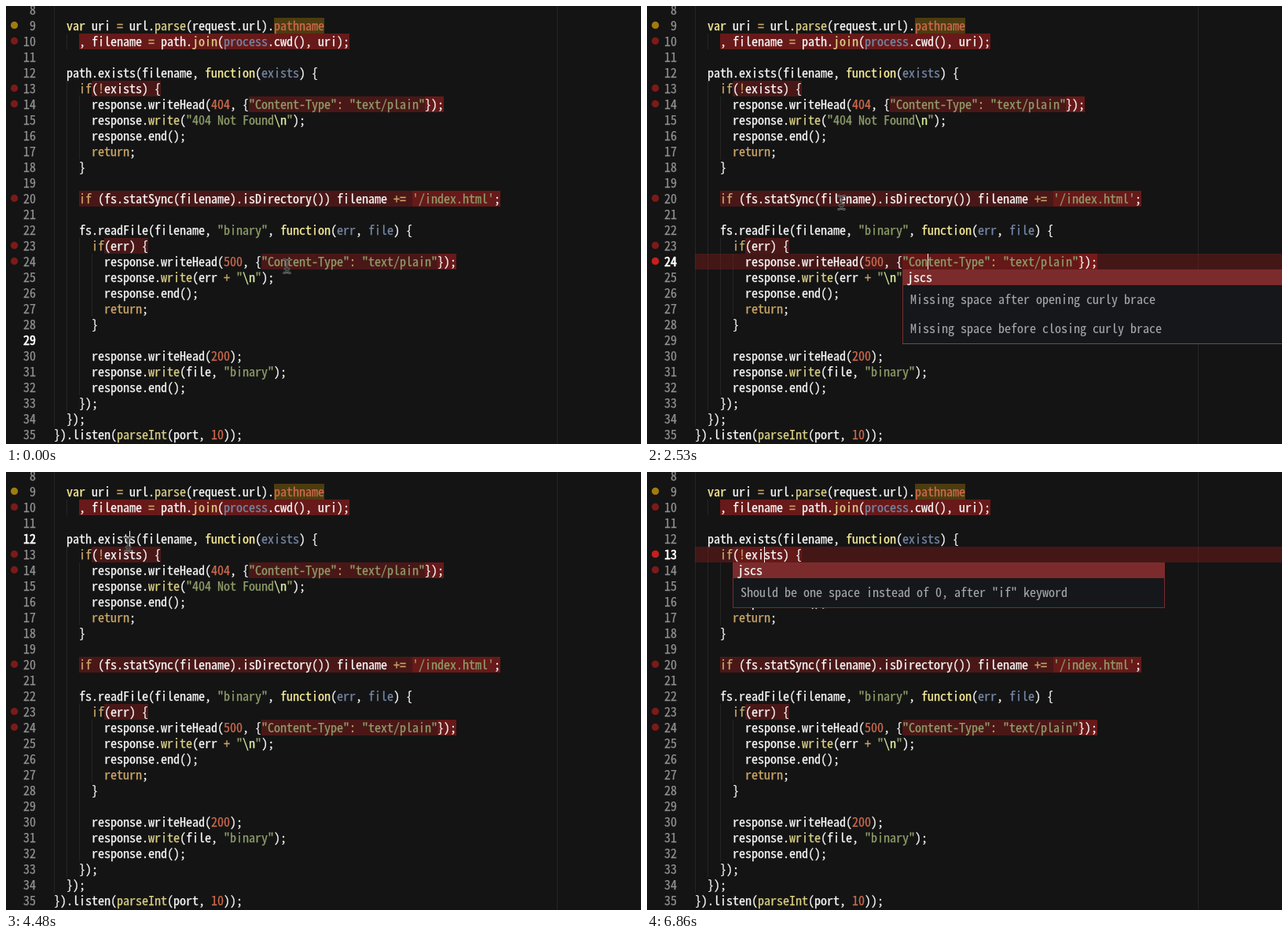
Write an HTML page that moves like this. It is 808 px wide and 557 px high and loops after 6.99 s.

```html
<!DOCTYPE html>
<html lang="en">
<head>
<meta charset="utf-8">
<title>Linter messages in a code editor</title>
<style>
html, body { margin: 0; width: 100%; height: 100%; overflow: hidden; background: #141414; }
svg {
  display: block;
  width: 808px;
  height: 557px;
  font-family: "Noto Sans Mono CJK JP", "Noto Sans Mono", "DejaVu Sans Mono", monospace;
  font-variant-ligatures: none;
}
text { white-space: pre; color: #f8f8f8; }
text, tspan { fill: currentColor; stroke: currentColor; stroke-width: .25px; }
.storage { color: #f9ee98; }
.keyword { color: #cda869; }
.support { color: #dad085; }
.string { color: #8f9d6a; }
.escape { color: #ddf2a4; }
.number { color: #cf6a4c; }
.param { color: #7587a6; }
.gutter { color: #909090; text-anchor: end; }
.now { color: #fff; stroke-width: .5px; }
.note { color: #a6a8ab; stroke-width: .1px; }
.guide { fill: #252525; }
.mark { fill: rgba(140, 28, 28, .45); }
.warn { fill: #4d3c10; }
.bar { fill: rgba(140, 28, 28, .4); }
.caret { fill: #f8f8f8; }
.dot { fill: #7c1a1a; }
.dot.hot { fill: #c81e1e; }
.dot.amber { fill: #a07b10; }
.panel { fill: #15171a; stroke: #7b2b2b; }
.head { fill: #7b2b2b; }
.foot { fill: #55565a; }
#mouse { fill: none; stroke-linecap: round; }
</style>
</head>
<body>
<svg viewBox="0 0 808 557">
  <defs>
    <path id="beam" d="M-4-8.5Q0-8.5 0-5.5Q0-8.5 4-8.5M0-5.5V5.5M-4 8.5Q0 8.5 0 5.5Q0 8.5 4 8.5M-2.5 3.5H2.5"/>
  </defs>
  <g id="guides"></g>
  <g id="bars"></g>
  <g id="marks"></g>
  <g id="code"></g>
  <g id="over"></g>
  <g id="carets"></g>
  <g id="mouse">
    <use href="#beam" stroke="#8d8d8d" stroke-width="2.4"/>
    <use href="#beam" stroke="#111"/>
  </g>
</svg>
<script>
const LOOP = 6990, FIRST = 8, LEFT = 61, CELL = 8, ROW = 20;

const lines = String.raw`

  var uri = url.parse(request.url).pathname
    , filename = path.join(process.cwd(), uri);

  path.exists(filename, function(exists) {
    if(!exists) {
      response.writeHead(404, {"Content-Type": "text/plain"});
      response.write("404 Not Found\n");
      response.end();
      return;
    }

    if (fs.statSync(filename).isDirectory()) filename += '/index.html';

    fs.readFile(filename, "binary", function(err, file) {
      if(err) {
        response.writeHead(500, {"Content-Type": "text/plain"});
        response.write(err + "\n");
        response.end();
        return;
      }

      response.writeHead(200);
      response.write(file, "binary");
      response.end();
    });
  });
}).listen(parseInt(port, 10));`.split('\n').slice(1);

const blankDepth = { 8: 1, 11: 1, 19: 2, 21: 2, 29: 3 };

// [line, first column, end column, class]; overlapping marks add up
const marks = [
  [9, 35, 43, 'warn'],
  [10, 4, 47, 'mark'], [10, 4, 47, 'mark'],
  [13, 6, 17, 'mark'],
  [14, 31, 62, 'mark'], [14, 59, 62, 'mark'],
  [20, 4, 71, 'mark'], [20, 57, 71, 'mark'],
  [23, 8, 15, 'mark'],
  [24, 33, 64, 'mark'], [24, 61, 64, 'mark']
];

// What is selected when; blink lists the times the caret is lit.
const scenes = [
  { from: 0, to: 590, line: 29, col: 0, blink: [[150, 590]] },
  { from: 590, to: 2680, line: 24, col: 37, blink: [[590, 1040], [1490, 1940], [2380, 2680]],
    x: 325, notes: ['Missing space after opening curly brace', 'Missing space before closing curly brace'] },
  { from: 2680, to: 4480, line: 20, col: 23, blink: [[2680, 3130], [3580, 3880], [4330, 4480]],
    x: 93, notes: ['If statement without curly braces', 'Invalid quote mark found'] },
  { from: 4480, to: 5080, line: 12, col: 12, blink: [[4480, 4930]] },
  { from: 5080, to: LOOP, line: 13, col: 11, blink: [[5080, 5530], [5970, 6420], [6860, LOOP]],
    x: 109, notes: ['Should be one space instead of 0, after "if" keyword'] }
];

const $ = id => document.getElementById(id);
const rowY = line => (line - 9) * ROW + 15;
const colX = col => LEFT + col * CELL;

function add(parent, tag, attrs, html = '') {
  const el = document.createElementNS('http://www.w3.org/2000/svg', tag);
  for (const key in attrs) el.setAttribute(key, attrs[key]);
  el.innerHTML = html;
  return parent.appendChild(el);
}
const rect = (parent, cls, x, y, width, height) =>
  add(parent, 'rect', { class: cls, x, y, width, height });
const label = (parent, cls, x, y, html) => add(parent, 'text', { class: cls, x, y }, html);
const dot = (parent, cls, line) =>
  add(parent, 'circle', { class: 'dot ' + cls, cx: 10.6, cy: rowY(line) + 9.4, r: 4.6 });

const span = (cls, s) => `<tspan class="${cls}">${s}</tspan>`;
const rules = [
  ['string', /"[^"]*"|'[^']*'/],
  ['param', /(?<=function\([^)]*)\b\w+|\bprocess\b/],
  ['storage', /\b(?:var|function)\b/],
  ['keyword', /\b(?:if|return)\b|[=!+:]+/],
  ['support', /\b(?:write|parse|join|parseInt)\b/],
  ['number', /\b\d+\b|\bpathname\b/]
];
const lexer = new RegExp(rules.map(r => `(${r[1].source})`).join('|'), 'g');

function highlight(line) {
  return line.replace(lexer, (token, ...groups) => {
    const [cls] = rules[groups.slice(0, rules.length).findIndex(Boolean)];
    return span(cls, token.replace(/\\n/, s => span('escape', s)));
  });
}

// Keyframes that keep each value until the next time.
function hold(el, prop, list) {
  const frames = list.map(([ms, value]) =>
    ({ offset: ms / LOOP, [prop]: value, easing: 'steps(1, end)' }));
  frames.push({ offset: 1, [prop]: list[list.length - 1][1] });
  el.animate(frames, { duration: LOOP, iterations: Infinity });
}
function show(el, spans) {
  const list = spans[0][0] > 0 ? [[0, 0]] : [];
  for (const [from, to] of spans) {
    list.push([from, 1]);
    if (to < LOOP) list.push([to, 0]);
  }
  hold(el, 'opacity', list);
}

function drawPopup(parent, { line, x, notes }) {
  const y = rowY(line) + ROW, h = ROW + notes.length * 37 + 1;
  rect(parent, 'panel', x + .5, y + .5, 549, h - 1);
  rect(parent, 'head', x, y, 550, ROW);
  if (notes.length > 1) rect(parent, 'foot', x, y + h - 1, 550, 1);
  label(parent, '', x + 6, y + 15.5, 'jscs');
  notes.forEach((note, i) => label(parent, 'note', x + 10, y + 44 + i * 37, note));
}

// Size the font so that one cell is exactly 8px wide.
const stage = document.querySelector('svg');
const pen = document.createElement('canvas').getContext('2d');
pen.font = '100px ' + getComputedStyle(stage).fontFamily;
stage.style.fontSize = CELL * 100 / pen.measureText('m').width + 'px';

lines.forEach((row, i) => {
  const line = FIRST + i, y = rowY(line), indent = row.search(/\S/);
  const depth = indent < 0 ? blankDepth[line] : indent / 2;
  for (let k = 0; k < depth; k++) rect($('guides'), 'guide', colX(k * 2), y, 1, ROW);
  label($('code'), 'gutter', 38, y + 16, line);
  if (indent >= 0) label($('code'), '', colX(indent), y + 16, highlight(row.trim()));
});
rect($('guides'), 'guide', 701, 0, 1, 557);

for (const [line, a, b, cls] of marks) rect($('marks'), cls, colX(a), rowY(line), (b - a) * CELL, ROW);
dot($('marks'), 'amber', 9);
for (const line of [10, 13, 14, 20, 23, 24]) dot($('marks'), '', line);

for (const scene of scenes) {
  const { from, to, line, col, blink, notes } = scene;
  const over = add($('over'), 'g');
  label(over, 'gutter now', 38, rowY(line) + 16, line);
  if (notes) {
    show(rect($('bars'), 'bar', LEFT, rowY(line), 808 - LEFT, ROW), [[from, to]]);
    dot(over, 'hot', line);
    drawPopup(over, scene);
  }
  show(over, [[from, to]]);
  show(rect($('carets'), 'caret', colX(col), rowY(line), 1, ROW), blink);
}

// The pointer moves in ticks along eased straight paths.
const place = (x, y) => `translate(${x}px, ${y}px)`;
function glide(start, count, [x0, y0], [x1, y1]) {
  return Array.from({ length: count }, (_, i) => {
    const p = (i + 1) / count, e = p * p * (3 - 2 * p);
    return [start + i * 148.5, place(x0 + (x1 - x0) * e, y0 + (y1 - y0) * e)];
  });
}
hold($('mouse'), 'transform', [
  [0, place(357.5, 331)], [150, place(357, 330.5)], [290, place(357, 329.5)], [1190, place(355.5, 320)],
  ...glide(1790, 5, [355.5, 320], [247.5, 250]),
  [2680, place(247, 249.5)],
  ...glide(3430, 7, [247, 249.5], [155.5, 92]),
  [5080, place(152, 104)],
  ...glide(5530, 7, [152, 104], [759, 538])
]);
show($('mouse'), [[0, 6570]]);
</script>
</body>
</html>
```
